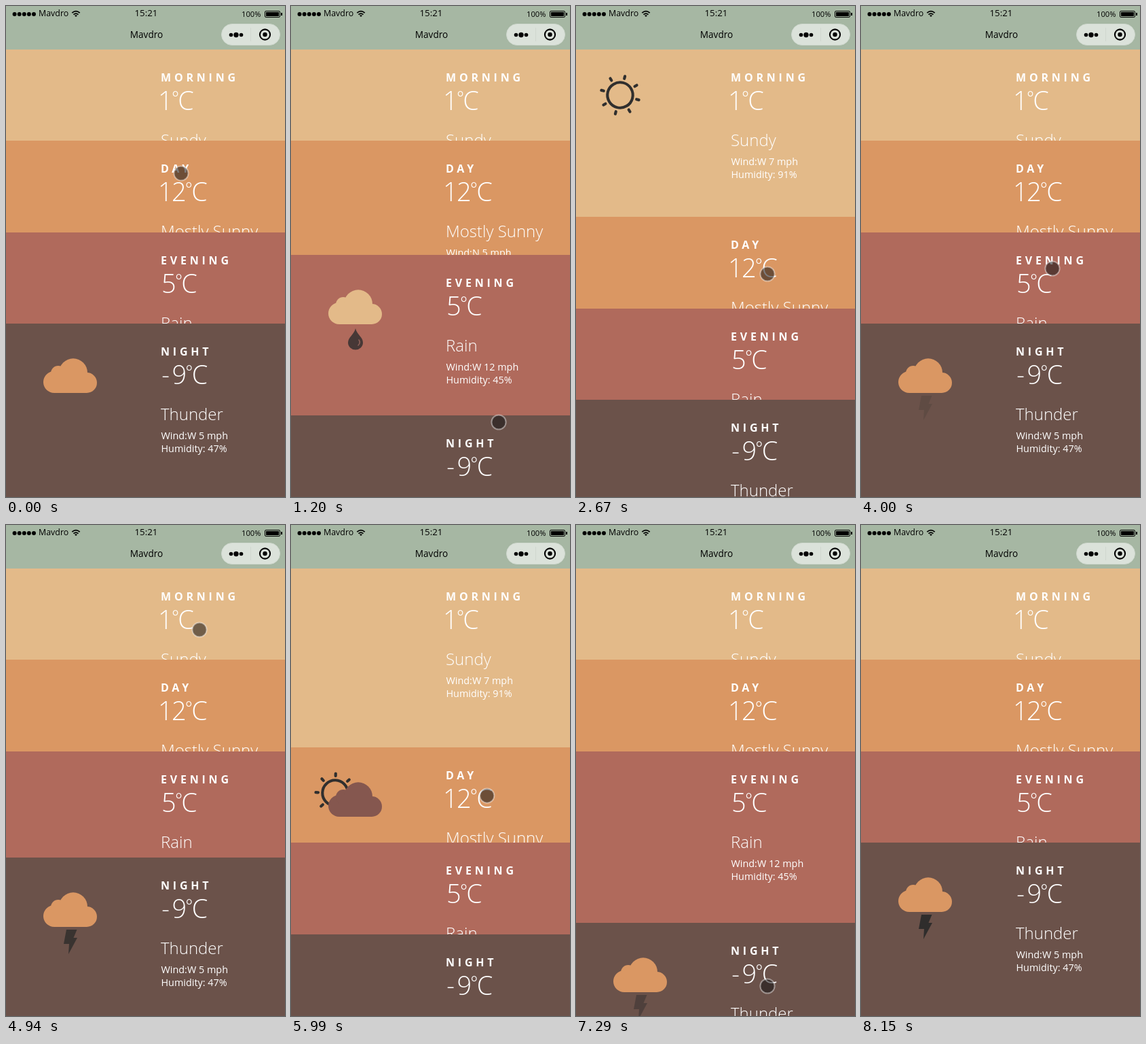
These frames come from a looping animation (411x722 px, 8.25 s). An HTML page:

```html
<!DOCTYPE html>
<html lang="en">
<head>
<meta charset="utf-8">
<title>Weather panels</title>
<style>
  html, body { margin: 0; width: 100%; height: 100%; overflow: hidden; background: #6b524a; }
  svg { display: block; width: 411px; height: 722px; font-family: "Open Sans", "Noto Sans", sans-serif; }
  .panel text { fill: #fff; }
  .part { font-size: 16px; font-weight: 700; letter-spacing: 4.8px; }
  .temp { font-size: 38px; font-weight: 300; letter-spacing: -1.8px; }
  .deg { font-size: 26px; }
  .sky { font-size: 24px; font-weight: 300; }
  .info { font-size: 14.4px; font-weight: 500; }
  .ray { stroke: #302f2e; stroke-width: 4.2; stroke-linecap: round; }
</style>
</head>
<body>
<svg viewBox="0 0 411 722">
  <defs>
    <g id="cloud">
      <circle cx="71" cy="86" r="16"/>
      <circle cx="77" cy="73" r="11"/>
      <circle cx="99" cy="72.3" r="21"/>
      <circle cx="119" cy="87" r="15"/>
      <path d="M71 70H119V102H71z"/>
    </g>
    <g id="sun">
      <circle r="18.7" fill="none" stroke="#302f2e" stroke-width="4.1"/>
      <g id="rays"></g>
    </g>
    <path id="bolt" fill="#2f2d2c" d="M89 106H104.5L99.5 118H105L92 142L93 127H85z"/>
    <g id="drop">
      <path fill="#453735" d="M95 108C97 117 106 121 106 129A11 10.5 0 0 1 84 129C84 121 93 117 95 108z"/>
      <path d="M100 125Q103 129 99 133" fill="none" stroke="#8d6259" stroke-width="1.6" stroke-linecap="round"/>
    </g>
  </defs>

  <g id="panels"></g>

  <g id="header">
    <rect width="411" height="64" fill="#a6b7a3"/>
    <g id="signal"></g>
    <text x="48" y="15" font-size="12.4">Mavdro</text>
    <g fill="none" stroke="#000" stroke-width="1.8">
      <path d="M97.3 10.2Q103 5 108.7 10.2M99.5 12.7Q103 9.6 106.5 12.7"/>
      <path d="M101 14L103 16L105 14Q103 12.6 101 14z" fill="#000" stroke="none"/>
    </g>
    <text x="206.5" y="15" font-size="13.3" text-anchor="middle">15:21</text>
    <text x="347" y="16" font-size="11.2">100%</text>
    <rect x="381.5" y="7.5" width="22" height="9" rx="1.5" fill="none" stroke="#000"/>
    <path d="M383 9H402V15H383zM405 10H407V14H405z"/>
    <text x="207" y="47" font-size="13.6" text-anchor="middle">Mavdro</text>
    <rect x="317.5" y="26.5" width="86" height="31" rx="15.5" fill="#dbe2da" stroke="#d0d9cf"/>
    <path d="M360.5 32V52" stroke="#cfd7ce"/>
    <circle cx="331.5" cy="42.5" r="2.8"/>
    <circle cx="339" cy="42.5" r="3.7"/>
    <circle cx="346.5" cy="42.5" r="2.8"/>
    <circle cx="381.5" cy="42" r="7.6" fill="none" stroke="#000" stroke-width="2.1"/>
    <circle cx="381.5" cy="42" r="3.2"/>
  </g>

  <circle id="touch" r="10.6" fill="#141214" fill-opacity=".55" stroke="#fff" stroke-opacity=".42" stroke-width="2"/>
</svg>

<script>
const LOOP = 8250, FRAME = LOOP / 62, LEAD = 30;
const TOP = 64, UNIT = 134.4;
const SLIDE = 600, TRAVEL = 260, BLINK = 640, PEAK = 240;
const MORNING = 0, DAY = 1, EVENING = 2, NIGHT = 3;
const $ = id => document.getElementById(id);

const sun = '<g transform="translate(65 67)"><use class="spin" href="#sun"/></g>';
const cloud = fill => `<use href="#cloud" fill="${fill}"/>`;
const blink = id => `<use class="blink" href="#${id}"/>`;

const data = [
  { name: 'MORNING', color: '#e3ba89', x: 224, temp: '1', sky: 'Sundy', wind: 'W 7', wet: 91, icon: sun },
  { name: 'DAY', color: '#da9763', x: 224, temp: '12', sky: 'Mostly Sunny', wind: 'N 5', wet: 45, icon: sun + cloud('#85574f') },
  { name: 'EVENING', color: '#b06a5c', x: 229, temp: '5', sky: 'Rain', wind: 'W 12', wet: 45, icon: cloud('#e3ba89') + blink('drop') },
  { name: 'NIGHT', color: '#6b524a', x: 229, temp: '-<tspan dx="5">9</tspan>', sky: 'Thunder', wind: 'W 5', wet: 47, icon: cloud('#da9763') + blink('bolt') }
];

$('panels').innerHTML = data.map(d => `<g class="panel">
  <rect width="411" height="700" fill="${d.color}"/>
  <g class="icon">${d.icon}</g>
  <text class="part" x="228" y="47">${d.name}</text>
  <text class="temp" x="${d.x}" y="88.5">${d.temp}<tspan class="deg" dy="-8.5">°</tspan><tspan dy="8.5">C</tspan></text>
  <text class="sky" x="228" y="142">${d.sky}</text>
  <text class="info" x="228.5" y="170">Wind:${d.wind} mph</text>
  <text class="info" x="228.5" y="188.7">Humidity: ${d.wet}%</text>
</g>`).join('');

const repeat = (n, make) => Array.from({ length: n }, (_, i) => make(i)).join('');
$('rays').innerHTML = repeat(8, i => `<path class="ray" d="M0 -25V-28.5" transform="rotate(${i * 45})"/>`);
$('signal').innerHTML = repeat(5, i => `<circle cx="${12.6 + i * 7.1}" cy="12" r="3"/>`);

const panels = [...document.querySelectorAll('.panel')].map(el => ({
  el,
  icon: el.querySelector('.icon'),
  spin: el.querySelector('.spin'),
  blink: el.querySelector('.blink')
}));

// Time, panel to open, place of the touch.
const taps = [
  [-560, NIGHT, 284, 640],
  [60, DAY, 258, 246],
  [924, EVENING, 300, 545],
  [1380, NIGHT, 306, 612],
  [2341, MORNING, 285, 154],
  [2850, DAY, 282, 394],
  [3340, NIGHT, 284, 640],
  [4040, EVENING, 282, 386],
  [4600, NIGHT, 284, 640],
  [5200, MORNING, 285, 154],
  [5952, DAY, 289, 390],
  [6420, EVENING, 285, 545],
  [7248, NIGHT, 282, 678]
];

const clamp = p => Math.min(1, Math.max(0, p));
const mix = (a, b, k) => a + (b - a) * k;
const smooth = p => p * p * (3 - 2 * p);

// CSS "ease": cubic-bezier(.25, .1, .25, 1)
function ease(p) {
  const curve = (s, a, b) => 3 * (1 - s) ** 2 * s * a + 3 * (1 - s) * s * s * b + s ** 3;
  let lo = 0, hi = 1;
  for (let i = 0; i < 24; i++) {
    const mid = (lo + hi) / 2;
    if (curve(mid, .25, .25) < p) lo = mid; else hi = mid;
  }
  return curve(lo, .1, 1);
}

// How far each panel is open; every tap starts from where the last one got to.
function openness(t) {
  let open = [0, 0, 0, 1];
  taps.forEach(([start, target], i) => {
    const end = Math.min(t, taps[i + 1]?.[0] ?? LOOP);
    const k = ease(clamp((end - start) / SLIDE));
    open = open.map((v, j) => mix(v, j === target ? 1 : 0, k));
  });
  return open;
}

function moveTouch(tap, next, age) {
  const [, , x, y] = tap;
  const [, , nx, ny] = next ?? tap;
  const k = smooth(clamp(age / TRAVEL));
  $('touch').setAttribute('cx', mix(x, nx, k));
  $('touch').setAttribute('cy', mix(y, ny, k));
  $('touch').style.display = next || age < SLIDE ? '' : 'none';
}

function draw(t) {
  const now = taps.findLastIndex(tap => tap[0] <= t);
  const [since, active] = taps[now];
  const age = t - since;
  const open = openness(t);
  let y = TOP;
  panels.forEach((p, i) => {
    p.el.setAttribute('transform', `translate(0 ${Math.round(y)})`);
    p.icon.style.display = i === active ? '' : 'none';
    p.spin?.setAttribute('transform', `rotate(${age * .045})`);
    p.blink?.setAttribute('opacity', .5 + .5 * Math.cos((age - PEAK) / BLINK * 2 * Math.PI));
    y += UNIT * (1 + open[i]);
  });
  moveTouch(taps[now], taps[now + 1], age);
}

function tick() {
  const step = Math.floor((performance.now() % LOOP + LEAD) / FRAME);
  draw(step * FRAME % LOOP);
  requestAnimationFrame(tick);
}
tick();
</script>
</body>
</html>
```
